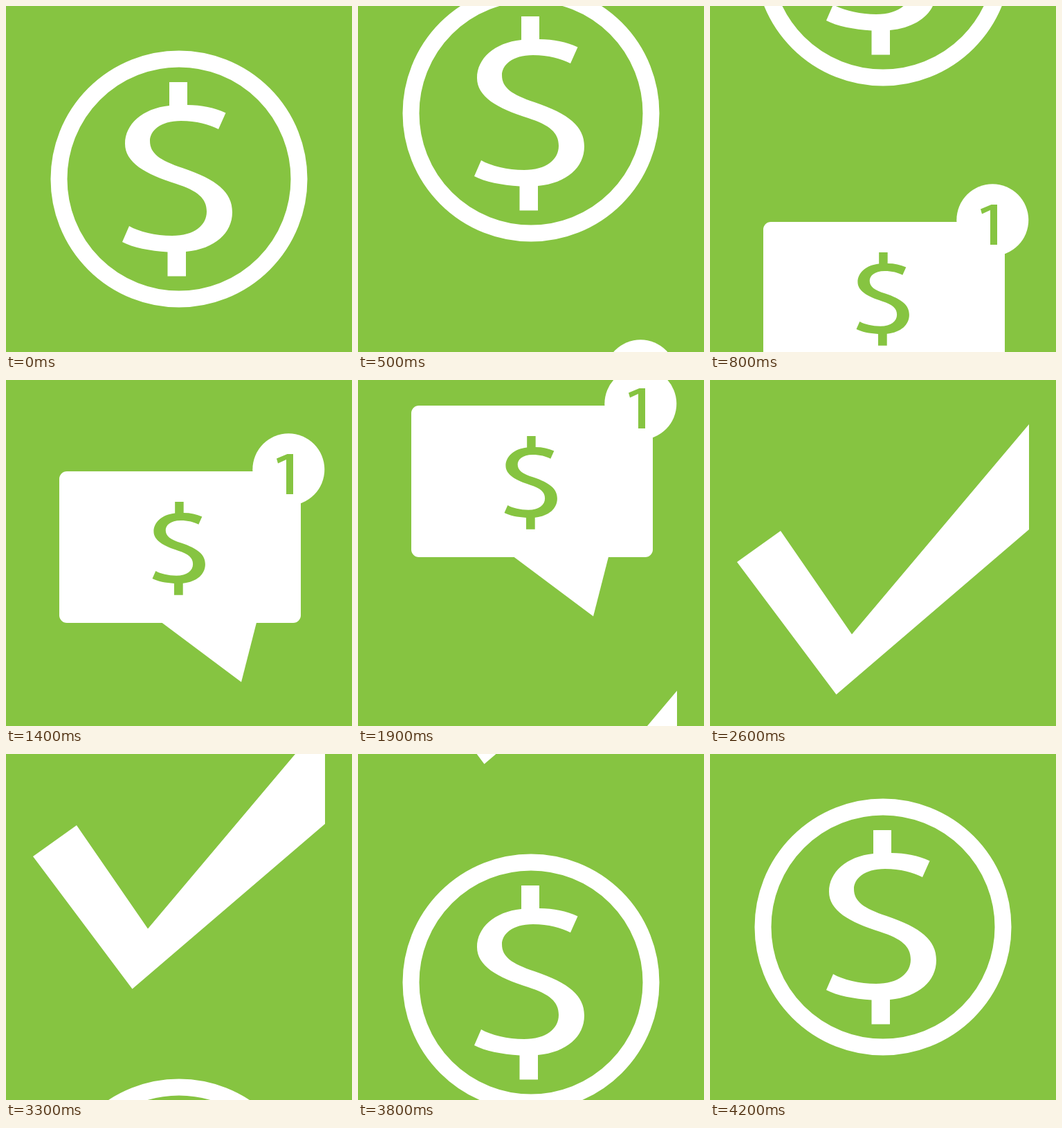
An HTML page that plays this animation: 500 px wide and 500 px high, repeating every 4300 ms.

```html
<!DOCTYPE html>
<html lang="en">
<head>
<meta charset="utf-8">
<title>Payment notice</title>
<style>
  html, body { margin: 0; height: 100%; overflow: hidden; background: #86c441; }
  svg { display: block; width: 100vw; height: 100vh; }
</style>
</head>
<body>
<svg viewBox="0 0 500 500" fill="#fff">
  <defs>
    <path id="dollar" d="M236 110H262V143C283 143 301 147 317.500 154.500L307 178C293 171 276 166 253 166C222 166 208 181 208 195C208 213 222 223 255 234C305 251 327 269 327 298C327 328 302 351 260 355V390.500H233.500V355.500C208 354 183 349 168 341L178 318C192 326 216 332 240 332C272 332 290 317 290 297C290 278 277 267 246 257C201 243 172 226 172 199C172 171 197 148 236 144Z"/>
    <g id="coin">
      <circle cx="250" cy="250" r="173.500" fill="none" stroke="#fff" stroke-width="24"/>
      <use href="#dollar"/>
    </g>
  </defs>
  <g id="strip">
    <use href="#coin"/>
    <g transform="translate(0 500)">
      <rect x="77" y="132" width="349" height="219" rx="11"/>
      <path d="M225 350.500H362L340 436.500Z"/>
      <circle cx="408.300" cy="129.300" r="52"/>
      <g fill="#86c441">
        <use href="#dollar" transform="translate(130.800 123.200) scale(.4804)"/>
        <path d="M415 107V165H405V115L393 120.500L391 113.500L406.500 107Z"/>
      </g>
    </g>
    <path transform="translate(0 1000)" d="M39 243L102 198L205 347.500L461 44V196L182.500 434.500Z"/>
    <use href="#coin" y="1500"/>
  </g>
</svg>
<script>
  const LOOP = 4300, TICK = 100, HOLD = 4, STEPS = 10, PAGE = 500;
  const strip = document.getElementById("strip");
  const easeOut = p => 1 - (1 - p) ** 2;

  function draw() {
    const tick = Math.floor(performance.now() % LOOP / TICK);
    const page = Math.floor(tick / (HOLD + STEPS));
    const step = Math.max(0, tick % (HOLD + STEPS) - HOLD);
    const scroll = PAGE * (page + easeOut(step / STEPS));
    strip.setAttribute("transform", `translate(0 ${-scroll})`);
    requestAnimationFrame(draw);
  }
  draw();
</script>
</body>
</html>
```
